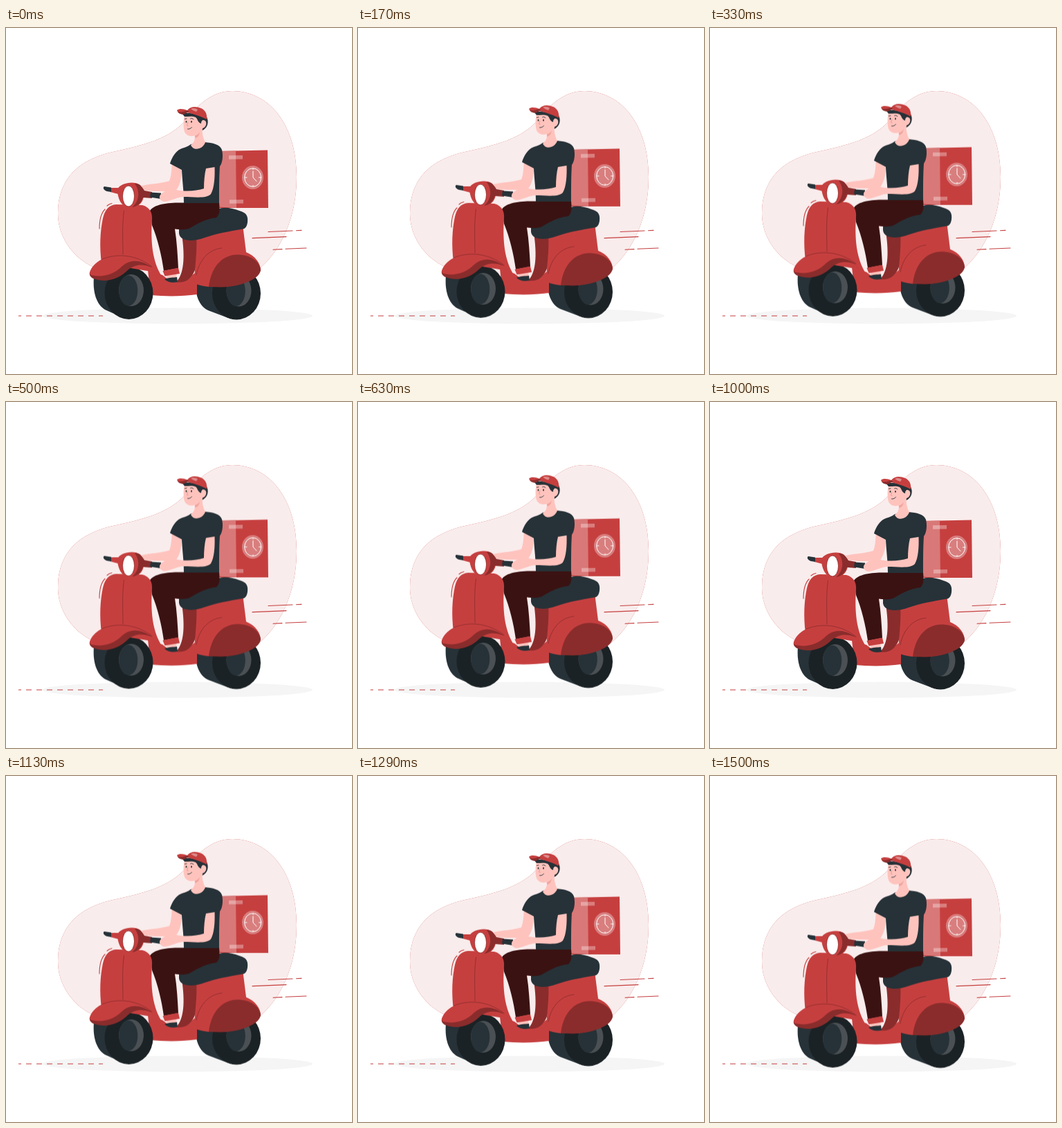
Write an HTML page that moves like this. It is 500 px wide and 500 px high and loops after 1540 ms.

```html
<!DOCTYPE html>
<html lang="en">
<head>
<meta charset="utf-8">
<title>Scooter delivery</title>
<style>
  html, body { margin: 0; width: 100%; height: 100%; overflow: hidden; background: #fff; }
  svg { display: block; width: 100vw; height: 100vh; }
  .red { fill: #c63f3f; }
  .deep { fill: #8a2c2c; }
  .dark { fill: #263238; }
  .tyre { fill: #1b2225; }
  .skin { fill: #ffc3bd; }
  .pants { fill: #3b1212; }
  .veil { fill: #fff; opacity: .33; }
  .line { fill: none; stroke: #c63f3f; stroke-width: 1.1; stroke-linecap: round; }
  .seam { fill: none; stroke: #8a2c2c; stroke-width: .8; stroke-linecap: round; }
  .ink { fill: none; stroke: #263238; stroke-width: .9; stroke-linecap: round; }
  .white { fill: none; stroke: #fff; stroke-width: 1; stroke-linecap: round; }
  #ride { animation: bob 1540ms linear infinite; }
  @keyframes bob {
    0% { transform: translateY(0); }
    47.4% { transform: translateY(-9.6px); }
    96.8%, 100% { transform: translateY(.4px); }
  }
</style>
</head>
<body>
<svg viewBox="0 0 500 500">
  <defs>
    <path id="blob" d="M75 268C75 214 110 190 150 180C200 169 236 161 262 131C281 106 302 91 327 91C380 91 420 139 420 215C420 275 397 322 366 348C330 374 200 374 128 346C95 332 75 300 75 268Z"/>
    <g id="wheel">
      <ellipse class="tyre" rx="35" ry="38"/>
      <ellipse cx="3.5" cy="-4" rx="18" ry="23" fill="#4a5054"/>
      <ellipse class="dark" cx="-.7" cy="-3.500" rx="13.500" ry="22"/>
    </g>
  </defs>

  <use href="#blob" class="red"/>
  <use href="#blob" fill="#fff" opacity=".9"/>
  <ellipse cx="248" cy="416" rx="195" ry="11.500" fill="#f5f5f5"/>
  <path class="line" style="stroke-linecap:butt;stroke-width:1.2" stroke-dasharray="8 7" stroke-dashoffset="4" d="M18 416H140"/>
  <path class="line" d="M379 294.500L414 293M419.500 292.800L427 292.400M356 303.600L405 301.600M386 320.200L399 319.600M404 319.300L434 318"/>

  <g id="ride">
    <!-- box -->
    <path class="red" d="M308 178L378 176.500L379 260L308 260Z"/>
    <path d="M306 178L332 177.500L333 260L306 258.500Z" fill="#d97878"/>
    <path class="veil" d="M322 184.300L342 184V189.500L322 189.800ZM323 248.200L343 247.900V253.400L323 253.700Z"/>
    <ellipse class="veil" cx="356.500" cy="216" rx="15.500" ry="17"/>
    <ellipse class="white" cx="356.700" cy="216" rx="12" ry="13.300"/>
    <path class="white" d="M357 207V216L362 221.500M357 203V204.500M357 227.500V229M345.500 216H348M365.500 216H368"/>

    <!-- rear wheel, floor and body -->
    <path class="dark" d="M274 360C272 385 279 402 292 408L325 420.500L340 350Z"/>
    <use href="#wheel" x="333" y="383.500"/>
    <path class="red" d="M205 350L226 357C240 369 255 369 262 362L276 352V385C255 388 230 388 209 386Z"/>
    <path class="deep" d="M254 298L278 296C279 330 277 352 264 363C258 368 250 368 246 367C257 356 259 332 254 298Z"/>
    <path class="red" d="M275 298L342 284L347 324C360 329 368 340 368 350C364 362 330 373 293 374C285 373 279 372 273 369C271 352 277 330 275 298Z"/>
    <path class="deep" d="M293 374C296 347 311 328 334 327.500C354 327.500 367 338 368 350C366 364 337 374 311 374.500Z"/>
    <path class="seam" d="M275 357C279 336 292 320 312 318"/>
    <path class="dark" d="M250 291L306 262C313 258 327 260 337 264C348 267 350 272 349 281C348 287 346 290 342 290.500C322 294 304 297 287 303C270 309 252 309 250 297Z"/>

    <!-- leg -->
    <path class="skin" d="M231 355L246 353L247 364H233Z"/>
    <path class="dark" d="M229 363C236 360 242 361 247 360L248 367C240 369 233 367 229 363Z"/>
    <path class="pants" d="M208 264C214 254 237 252 257 252.500H308C309 262 309 270 304 274C287 276 275 284 264 290C256 292 250 291 244 290.500C247 309 248 329 249 347L228 351C225 329 219 304 211 285Z"/>
    <path class="red" d="M226.500 351L249 346.500L251 355L229.500 358.500Z"/>

    <!-- far arm -->
    <path class="skin" d="M240 194L254 203C254 219 250 231 245 235C232 236 212 237 199 234L196 228C207 225 224 225 236 221C239 214 239 206 240 194Z"/>

    <!-- front wheel, shield and fender -->
    <path class="dark" d="M127 360C125 382 131 400 143 407L171 419.500L190 350Z"/>
    <use href="#wheel" x="177.500" y="383"/>
    <path class="red" d="M140 275C143 262 149 256 159 255L197 256C208 259 212 267 211 278C209 307 211 338 226 360L214 385L210 352L138 340C135 316 136 293 140 275Z"/>
    <path class="seam" d="M170.500 264C167.500 286 169 307 169 327"/>
    <path class="deep" d="M121 353C130 340 145 330 165 329C188 330 204 337 211 346C196 340 186 342 177 349C163 363 145 369 126 362C122 360 120 357 121 353Z"/>
    <path class="red" d="M121 353C126 338 145 328 165 328C188 329 206 336 211.500 346C193 334 180 334 168 344C155 357 138 361 123 357C121 356 121 355 121 353Z"/>
    <path class="seam" d="M139 334C158 326 187 326 211 345"/>
    <path class="line" d="M135 290C135 278 138 267 143 262M146 257C148 255 150 254 153 253.500"/>

    <!-- handlebar -->
    <path class="red" d="M151 231L166 231V241L151 237Z"/>
    <path class="dark" d="M142 229L152 230.500V237L146 236C142 235 139 231 142 229Z"/>
    <path class="red" d="M161 233C165 224 185 220 194 227C202 235 200 247 195 253C190 259 183 260 177 259C167 259 161 246 161 233Z"/>
    <path class="deep" d="M186 225C191 224 196 228 200 235L211 237V246L198 245C195 253 190 258 182 259C193 251 194 235 186 225Z"/>
    <path class="dark" d="M209 237.500L224 238.500V247L208 244.500Z"/>
    <ellipse cx="177" cy="243" rx="8.500" ry="15" fill="#fff" stroke="#8a2c2c" stroke-width=".8"/>

    <!-- torso and near arm -->
    <path class="dark" d="M267 168C263 172 255 173 250 176C243 181 239 189 237 196L254 205C255 224 257 235 257 253H308C308 230 308 215 309 200C313 195 314 184 312 176C309 168 299 166 287 165Z"/>
    <path class="skin" d="M289 203L301.500 201C302 215 301 232 296 240C290 247 271 244 257 244C247 244 240 250 228 251C222 249 220 244 224 240C229 236 236 232 243 233C256 237 274 236 286 232C286 221 287 211 289 203Z"/>

    <!-- head -->
    <path class="dark" d="M254 122L289 127C294 134 292 144 284 148L270 143Z"/>
    <path class="skin" d="M258 125C256 135 256 147 259 152C262 156 268 157 272.500 155.500C274 163 270 167 267 169C271 179 285 175 288 165C285 160 283 152 284 145C291 143 291 133 285 133L274 126Z"/>
    <path class="dark" d="M253 122L277 124C283 126 288 130 288 133C284 132 282 134 282 138C277 137 277 131 274 129C270 127 264 128 258 128Z"/>
    <path d="M273 155.500C277 155 279 152 280 150C279 156 277 158 273.500 159Z" fill="#f0a49e"/>
    <path class="red" d="M247 119C250 116 257 117 262 119C266 113 275 113 282 116C289 119 291 126 290 132C282 128 271 124 261 122C258 126 249 124 247 119Z"/>
    <path class="deep" d="M248 121C253 122 257 121 262 119L265 122C261 121 259 125 255 125C251 124 249 123 248 121Z"/>
    <path d="M267 117C270 115 275 116 277 118L275 121C272 120 270 119 267 117Z" fill="#dd8c8c"/>
    <g class="dark"><ellipse cx="260.500" cy="135.500" rx=".9" ry="1.400"/><ellipse cx="268" cy="135.500" rx=".9" ry="1.400"/></g>
    <path class="ink" d="M258.500 131.500L261 131M266.500 131C268 130 270 131 271 132M262.500 146C265 146.500 267 145 268.500 143.500"/>
    <path d="M263 136L261.500 141L263.500 141.500" fill="none" stroke="#e58f87" stroke-width=".8"/>
  </g>
</svg>
</body>
</html>
```
